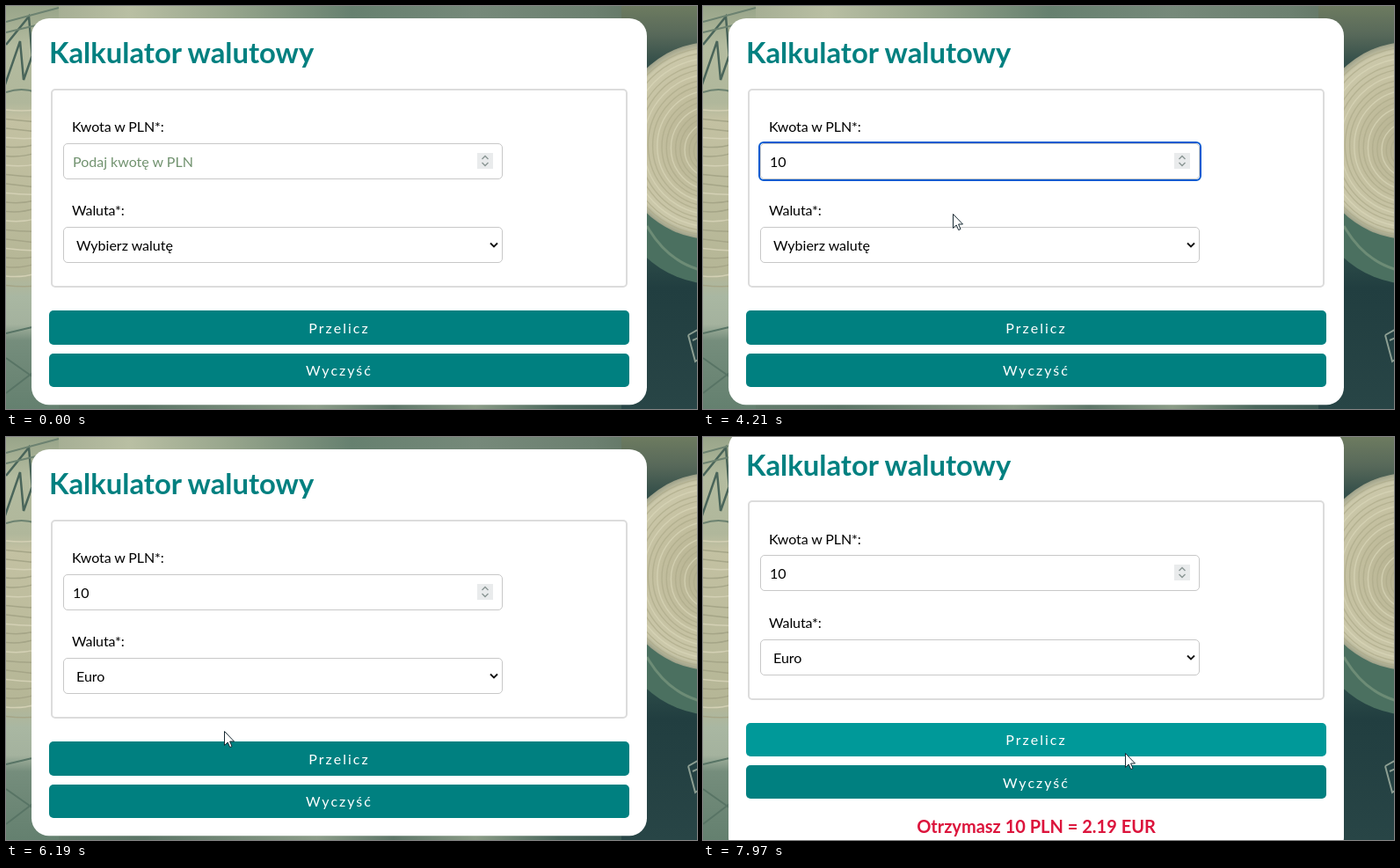
These frames come from a looping animation (786 by 458 pixels, 8000 ms). An HTML page:

```html
<!DOCTYPE html>
<html lang="pl">
<head>
<meta charset="utf-8">
<title>Kalkulator walutowy</title>
<style>
  html, body { margin: 0; width: 100%; height: 100%; overflow: hidden; background: #2b4a48; }
  svg { display: block; width: 786px; height: 458px; }
  text { font: 16px Lato, sans-serif; white-space: pre; }
  .title { font-size: 32.8px; font-weight: 700; fill: #008080; }
  .label { letter-spacing: -.1px; }
  .hint { fill: #71926f; }
  .button { fill: #fff; letter-spacing: 2px; text-anchor: middle; }
  .result { font-size: 20px; font-weight: 700; fill: #dc143c; text-anchor: middle; }
  .option { fill: #15141a; }
</style>
</head>
<body>
<svg viewBox="0 0 786 458">
  <defs>
    <linearGradient id="top">
      <stop offset="0" stop-color="#8c9a80"/>
      <stop offset=".06" stop-color="#a3ac92"/>
      <stop offset=".18" stop-color="#b9bfa3"/>
      <stop offset=".32" stop-color="#98a68d"/>
      <stop offset=".5" stop-color="#66806f"/>
      <stop offset=".68" stop-color="#76897a"/>
      <stop offset=".85" stop-color="#6c8070"/>
      <stop offset="1" stop-color="#566a58"/>
    </linearGradient>
    <linearGradient id="left" x2="0" y2="1">
      <stop offset="0" stop-color="#98a489"/>
      <stop offset=".1" stop-color="#b3bb9f"/>
      <stop offset=".24" stop-color="#b0b79b"/>
      <stop offset=".28" stop-color="#c3c1a2"/>
      <stop offset=".66" stop-color="#b5b696"/>
      <stop offset=".72" stop-color="#a9b7a2"/>
      <stop offset=".79" stop-color="#a4b29e"/>
      <stop offset=".83" stop-color="#758d7c"/>
      <stop offset="1" stop-color="#64806f"/>
    </linearGradient>
    <linearGradient id="right" x2="0" y2="1">
      <stop offset="0" stop-color="#6d7b60"/>
      <stop offset=".07" stop-color="#58695a"/>
      <stop offset=".14" stop-color="#344f4a"/>
      <stop offset=".5" stop-color="#3d5f55"/>
      <stop offset=".7" stop-color="#213e40"/>
      <stop offset="1" stop-color="#284546"/>
    </linearGradient>
    <linearGradient id="bottom">
      <stop offset="0" stop-color="#67806f"/>
      <stop offset=".2" stop-color="#5b7566"/>
      <stop offset=".45" stop-color="#8b9c88"/>
      <stop offset=".56" stop-color="#5d7668"/>
      <stop offset=".68" stop-color="#8a9b86"/>
      <stop offset=".8" stop-color="#4a675c"/>
      <stop offset="1" stop-color="#274546"/>
    </linearGradient>
    <radialGradient id="roll">
      <stop offset="0" stop-color="#b4b08f"/>
      <stop offset=".6" stop-color="#c4c0a0"/>
      <stop offset=".92" stop-color="#cbc8aa"/>
      <stop offset="1" stop-color="#9da088"/>
    </radialGradient>
  </defs>
  <g id="backdrop"></g>
  <g id="panel"></g>
  <g id="pointer"></g>
</svg>
<script>
const LOOP = 8000;
const TEAL = '#008080', TEAL_HOVER = '#009999';
const OPTIONS = ['Wybierz walutę', 'Euro', 'Dolar amerykański', 'Frank szwajcarski', 'Funt szterling'];

// from, to (ms), steps, x, y
const START = [806, 470];
const MOVES = [
  [730, 1020, 6, 580, 312],
  [1090, 1520, 8, 272, 180],
  [1570, 1630, 2, 272, 176],
  [4090, 4260, 4, 288, 256],
  [4440, 4630, 4, 271, 271],
  [5160, 5780, 10, 251, 325],
  [5840, 5950, 3, 248, 334],
  [6370, 6620, 5, 327, 358],
  [7380, 7570, 4, 420, 386],
  [7850, 7970, 3, 480, 359]
];
const CLICKS = [[1640, 1870], [4690, 4990], [6070, 6190], [6680, 6850]];
const CARET_ON = [[1770, 2270], [2800, 3910], [4440, 4690]];

const $ = id => document.getElementById(id);
const within = (t, [a, b]) => t >= a && t < b;
const during = (t, spans) => spans.some(s => within(t, s));
const rect = (x, y, w, h, fill, rx = 0, extra = '') =>
  `<rect x="${x}" y="${y}" width="${w}" height="${h}" rx="${rx}" fill="${fill}" ${extra}/>`;
const path = (d, stroke, width = 1, fill = 'none') =>
  `<path d="${d}" stroke="${stroke}" stroke-width="${width}" fill="${fill}"/>`;
const label = (x, y, s, cls = '') => `<text x="${x}" y="${y}" class="${cls}">${s}</text>`;
const frame = (x, y, r, b, w, color, rx, fill = 'none') =>
  rect(x + w / 2, y + w / 2, r - x - w, b - y - w, fill, rx, `stroke="${color}" stroke-width="${w}"`);
const ellipse = (x, y, rx, ry, fill, extra = '') =>
  `<ellipse cx="${x}" cy="${y}" rx="${rx}" ry="${ry}" fill="${fill}" ${extra}/>`;

function backdrop() {
  let s = rect(0, 0, 786, 40, 'url(#top)') + rect(0, 440, 786, 18, 'url(#bottom)') +
    rect(0, 0, 60, 458, 'url(#left)') + rect(700, 0, 86, 458, 'url(#right)');

  // engraved lines and stacked paper edges on the left
  s += path('M0 44L26 12L30 60M-2 92L16 40L20 84L32 50', '#4a655a', 2.5);
  s += path('M0 18L60 2M0 30L34 22M0 98Q18 92 34 98', '#6c8270', 2);
  for (let i = 0; i < 20; i++) {
    const y = 118 + i * 10.5;
    s += path(`M0 ${y}Q18 ${y + 2} 34 ${y + 4 * Math.sin(i)}`, i % 3 ? '#a5a587' : '#d3d0b4', 1.5);
  }
  s += path('M0 372L34 364M0 400L34 424M0 440L34 414', '#587465', 2);

  // rolls on the right
  s += ellipse(806, 208, 112, 108, '#4b7060');
  s += ellipse(802, 153, 108, 112, 'url(#roll)');
  for (let i = 1; i < 20; i++) {
    s += ellipse(802, 153 + i * .7, 108 - i * 5.2, 112 - i * 5.4, 'none',
      `stroke="${i % 3 ? '#aeab8b' : '#dad7ba'}" stroke-width="1.4" stroke-opacity=".7"`);
  }
  s += path('M729 250Q752 290 790 300', '#6d8c76', 3);
  s += path('M776 374L790 366M776 374L784 404L790 400M781 380L790 376', '#8d9f93', 2);
  return s;
}

function cursorAt(t) {
  let [x, y] = START;
  for (const [a, b, n, tx, ty] of MOVES) {
    if (t < a) break;
    const k = Math.min(n, Math.floor((t - a) / (b - a) * (n - 1) + 1.001)) / n;
    x += (tx - x) * k;
    y += (ty - y) * k;
  }
  return [Math.round(x), Math.round(y)];
}

function button(top, bottom, baseline, name, hover) {
  return rect(49, top, 660, bottom - top, hover ? TEAL_HOVER : TEAL, 5) + label(379, baseline, name, 'button');
}

function dropdown(active) {
  const rowY = i => Math.round(297 + i * 26.6);
  let s = rect(69, 298, 499, 140, 'rgba(0,0,0,.12)', 2) + rect(68, 298, 499, 139, 'rgba(0,0,0,.5)', 1) +
    frame(65, 292, 565, 435, 1, '#d2d2d6', 0, '#f9f9fb');
  s += rect(66, rowY(active), 498, rowY(active + 1) - rowY(active), '#e0dfe6');
  OPTIONS.forEach((name, i) => { s += label(72, Math.round(315.2 + i * 26.7), name, 'option'); });
  return s;
}

function panel(t, [x, y]) {
  const done = t >= 6850, open = within(t, [4750, 6190]), focus = within(t, [1770, 4690]);
  const shift = done ? 21.7 : 0;
  const at = v => Math.round(v - shift);
  const amount = t < 3030 ? '' : t < 3330 ? '1' : '10';
  const hover = (top, bottom) => !open && x >= 49 && x < 709 && y >= top && y < bottom;
  const b1 = [at(346.3), at(384.7)], b2 = [at(394.7), at(433.1)];

  let s = rect(29, 14 - shift, 700, 439.3 + 2 * shift, '#fff', 20);
  s += label(49, at(65.2), 'Kalkulator walutowy', 'title');
  s += frame(51, at(94), 707, at(320.3), 2, '#dcdcdc', 4);

  s += label(75, at(143.3), 'Kwota w PLN*:', 'label');
  const top = at(156);
  s += frame(65, top, 565, top + 41, 1, '#c8c8c8', 4.5);
  if (focus) s += frame(63, top - 2, 567, top + 43, 2, '#0a5bd0', 5);
  s += amount ? label(76, at(183), amount) : label(76, at(183), 'Podaj kwotę w PLN', 'hint');
  if (focus && during(t, CARET_ON)) s += rect(76 + Math.round(amount.length * 9.3), top + 11, 1, 19, '#000');
  s += rect(536, top + 11, 18, 18, '#e9ebec');
  s += path(`M541.5 ${top + 18}l3.5-3.5 3.5 3.5m-7 4l3.5 3.5 3.5-3.5`, '#8a9694', 1.4);

  s += label(75, at(238.3), 'Waluta*:', 'label');
  const mid = at(251.4);
  s += frame(65, mid, 565, mid + 41, 1, '#c8c8c8', 4.5);
  s += label(80, at(278.3), t < 6190 ? OPTIONS[0] : OPTIONS[1]);
  s += path(`M551 ${mid + 18.5}l4 4 4-4`, '#111', 1.8);

  s += button(...b1, at(371.9), 'Przelicz', hover(...b1));
  s += button(...b2, at(420.3), 'Wyczyść', hover(...b2));
  if (done) s += label(379, 450, 'Otrzymasz 10 PLN = 2.19 EUR', 'result');
  if (open) s += dropdown(y >= 324 ? 1 : 0);
  return s;
}

function pointer(t, [x, y]) {
  const halo = during(t, CLICKS) ? '<circle r="12" fill="#ff0" fill-opacity=".5"/>' : '';
  const inField = t < 6850 && x > 65 && x < 536 && y >= 156 && y < 197;
  const arrow = 'M.5 .5V16.5L4.2 13L6.7 18.6L9 17.6L6.6 12H11.5Z';
  const shape = inField
    ? halo + path('M-3-7.5H0M1-7.5H4M-3 7.5H0M1 7.5H4M.5-7V7', '#111')
    : path(arrow, 'none', 0, '#fff') + halo + path(arrow, '#172a33');
  return `<g transform="translate(${x} ${y})">${shape}</g>`;
}

const shown = {};
function put(id, markup) {
  if (shown[id] !== markup) $(id).innerHTML = shown[id] = markup;
}

function draw(t) {
  const pos = cursorAt(t);
  put('panel', panel(t, pos));
  put('pointer', pointer(t, pos));
}

const origin = performance.now();
function tick() {
  draw((performance.now() - origin) % LOOP);
  requestAnimationFrame(tick);
}
put('backdrop', backdrop());
tick();
</script>
</body>
</html>
```
